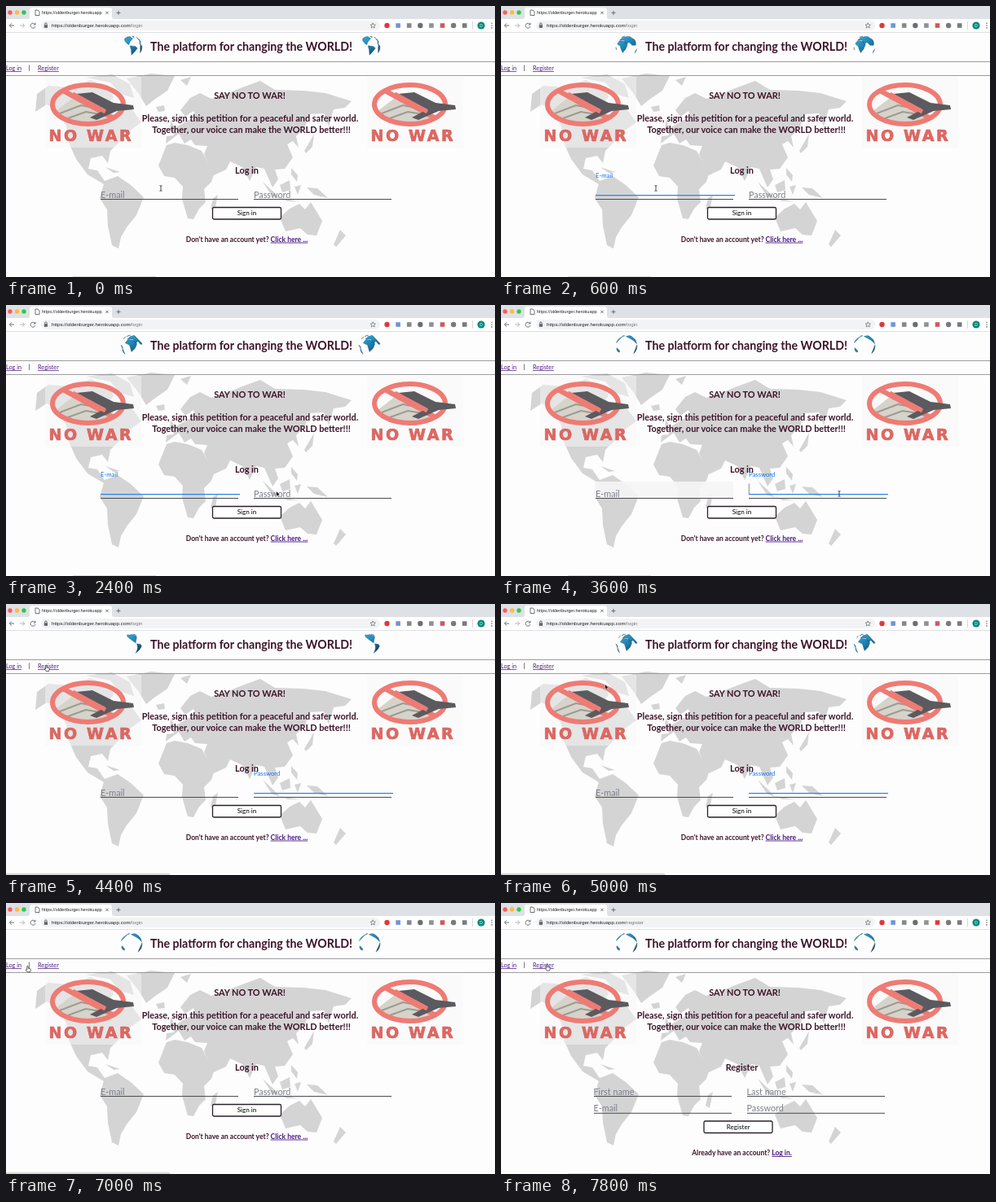
An HTML page for the animation above (8000 ms loop, 600 px wide and 333 px high).

```html
<!DOCTYPE html>
<html lang="en">
<head>
<meta charset="utf-8">
<title>Petition login</title>
<style>
html, body { margin: 0; width: 100%; height: 100%; overflow: hidden; background: #fdfdfd; }
svg { display: block; width: 600px; height: 333px; }
text { font-family: Lato, sans-serif; }
.ui text, .list text { font-family: "Liberation Sans", Arial, sans-serif; }
.ui text { font-size: 6.25px; fill: #202124; }
.list text { font-size: 6.1px; fill: #222; }
.head { font-weight: 700; fill: #3d1428; text-anchor: middle; font-size: 10.9px; }
.small { font-size: 8.5px; }
.link { fill: #4b1a85; text-decoration: underline; }
.nav { font-size: 7.25px; }
.hint { font-size: 10.8px; fill: #7b7f8a; }
.label { font-size: 7.7px; fill: #0b74f5; }
.rule { stroke: #4c4c50; fill: none; }
.focus { stroke: #2a83f0; stroke-width: 1.4; }
.btn rect { fill: #fff; stroke: #2a2028; stroke-width: 1.3; }
.btn text { font-size: 8.1px; text-anchor: middle; }
.icon { fill: none; stroke: #5f6368; stroke-width: .9; }
.map { fill: #d4d4d4; }
</style>
</head>
<body>
<svg viewBox="0 0 600 333">
  <defs>
    <linearGradient id="shade" gradientUnits="userSpaceOnUse" x1="146" y1="40" x2="162" y2="62">
      <stop offset=".1" stop-color="#2a9fd0"/><stop offset=".55" stop-color="#1a75a3"/><stop offset="1" stop-color="#17303f"/>
    </linearGradient>
    <g id="banner">
      <rect x="48" y="87" width="118" height="87" fill="#f8f8f8" opacity=".5"/>
      <path d="M60 130L82 113 124 119 128 138 98 146 70 141Z" fill="#d6d3ca"/>
      <path d="M66 132L92 122 118 127M76 138L98 130 122 134" stroke="#9b9b94" stroke-width="2" fill="none"/>
      <g fill="none" stroke="#ee7b74" stroke-width="6">
        <ellipse cx="100.5" cy="121" rx="43.5" ry="24"/>
        <path d="M70 104L132 138"/>
      </g>
      <path d="M86 108L106 106 132 119 156 122 157 127 136 129 111 140 103 137 122 127Z" fill="#5b5a5f"/>
      <path d="M82 108L122 130" fill="none" stroke="#ee7b74" stroke-width="5"/>
      <text x="52.5" y="166" style="font:700 19px 'DejaVu Sans',sans-serif;letter-spacing:2.6px" fill="#e5655f" stroke="#c96561" stroke-width=".7">NO WAR</text>
    </g>
    <path id="globe" fill="url(#shade)" stroke="#174a68" stroke-width=".4"/>
  </defs>

  <rect width="600" height="333" fill="#fdfdfd"/>
  <g class="map">
    <path d="M38 108L52 98 78 100 104 91 128 101 132 112 122 124 134 133 140 120 154 126 166 143 152 153 140 166 128 178 125 193 118 184 104 187 101 200 112 202 121 215 128 218 120 219 100 207 86 188 77 168 74 148 62 127 50 121 36 130Z"/>
    <path d="M98 88L130 84 152 96 157 113 140 108 128 94Z"/>
    <path d="M121 215L137 209 153 220 169 235 160 257 148 272 141 284 138 298 130 294 125 270 124 250 115 236Z"/>
    <path d="M148 89L178 83 207 86 198 104 182 115 172 123 163 108Z"/>
    <path d="M197 171L207 168 223 171 240 178 249 194 256 204 252 216 243 225 245 241 237 249 230 262 223 261 216 237 217 222 207 211 194 209 187 196Z"/>
    <path d="M196 169L197 160 206 159 204 152 214 146 224 140 233 137 230 129 220 136 214 128 226 113 238 107 252 114 270 108 290 100 312 92 330 103 365 104 392 107 424 117 416 125 402 127 396 148 390 132 372 133 367 149 356 160 359 174 352 166 345 170 352 186 342 200 330 201 334 213 327 223 317 200 307 198 299 215 290 198 275 191 270 201 255 208 243 182 247 172 232 171 227 164 219 169 212 157Z"/>
    <path d="M336 260L348 249 360 243 367 250 374 241 388 264 381 282 370 281 361 273 343 277Z"/>
    <path d="M315 216L330 230 336 237 326 233ZM336 220L348 214 349 226 339 229ZM354 222L362 220 358 232ZM369 223L382 224 395 236 378 232ZM336 236L360 240 345 240ZM350 199L358 208 357 216 350 207Z"/>
    <path d="M366 178L373 166 378 157 376 173 368 181ZM201 154L202 141 209 152ZM184 124L194 122 195 129 187 130ZM254 236L260 232 256 252 251 249ZM410 275L417 282 405 296 402 293ZM122 198L140 204 132 205ZM214 91L227 87 222 98Z"/>
  </g>
  <use href="#banner"/><use href="#banner" x="395"/>
  <path d="M82 332.5H184" stroke="#ddd"/>

  <g class="ui">
    <path d="M0 0H600V16H0Z" fill="#dee1e6"/>
    <circle cx="5" cy="8" r="2.7" fill="#fc5b57"/><circle cx="13.5" cy="8" r="2.7" fill="#fdbc40"/><circle cx="22" cy="8" r="2.7" fill="#34c84a"/>
    <path d="M26 16Q29 16 29 13V5Q29 2 32 2H127Q130 2 130 5V13Q130 16 133 16H600V32.5H0V16Z" fill="#fff"/>
    <path id="doc" class="icon" d="M36 5H39L41 7V11.5H36Z"/>
    <path id="spin" class="icon" d="M38.5 5.2A3 3 0 0 0 35.5 8.2" style="stroke:#5a78b8"/>
    <text x="44" y="10.3" style="font-size:5.55px">https://oldenburger.herokuapp</text>
    <text x="117" y="10.3" style="font-size:5.5px" fill-opacity=".4">.</text>
    <path class="icon" d="M122.3 6.7L125.7 10.1M125.7 6.7L122.3 10.1M135.5 8.4H140.5M138 5.9V10.9"/>
    <path class="icon" d="M10 24H4.5M7 21.3L4.3 24L7 26.7"/>
    <path class="icon" d="M17 24H22.5M20 21.3L22.7 24L20 26.7" opacity=".5"/>
    <path id="reload" class="icon" d="M35.6 22.5A3 3 0 1 0 36 25M36 20.7V23H33.7"/>
    <path id="stop" class="icon" d="M30.5 21.5L35.5 26.5M35.5 21.5L30.5 26.5"/>
    <rect x="43" y="18" width="416" height="12" rx="6" fill="#f1f3f4"/>
    <path d="M46.8 23.3H51V26.8H46.8Z" fill="#5f6368"/><path class="icon" d="M47.7 23.5V22A1.2 1.2 0 0 1 50.1 22V23.5"/>
    <text x="56" y="26.1">https://oldenburger.herokuapp.com<tspan id="route" fill="#777b80">/login</tspan></text>
    <path class="icon" style="stroke-width:.7" d="M450.2 20.8L451.1 22.9 453.4 23.1 451.7 24.7 452.2 26.9 450.2 25.7 448.2 26.9 448.7 24.7 447 23.1 449.3 22.9Z"/>
    <g id="tools"></g>
    <path d="M572.5 19V29" stroke="#d5d7da"/>
    <circle cx="583" cy="24" r="4.6" fill="#00897b"/><text x="583" y="25.8" text-anchor="middle" style="font-size:5px;fill:#fff">D</text>
    <path d="M596 21.2V21.3M596 24V24.1M596 26.8V26.9" stroke="#5f6368" stroke-width="1.5" stroke-linecap="round"/>
    <path d="M0 32.5H600" stroke="#d8dadd" stroke-width=".8"/>
  </g>

  <use href="#globe"/><use href="#globe" x="292"/>
  <text class="head" x="301" y="54.5" style="font-size:14.2px">The platform for changing the WORLD!</text>
  <path d="M0 68.5H600M0 85.5H600" stroke="#929296" stroke-width=".9"/>
  <text class="nav link" x="0" y="79.3">Log in</text>
  <text class="nav" x="27.5" y="79">|</text>
  <text class="nav link" x="39" y="79.3">Register</text>
  <text class="head" x="299" y="114">SAY NO TO WAR!</text>
  <text class="head" x="299.5" y="142">Please, sign this petition for a peaceful and safer world.</text>
  <text class="head" x="301" y="156.2">Together, our voice can make the WORLD better!!!</text>

  <g id="login">
    <text class="head" x="295.5" y="206">Log in</text>
    <rect id="fade" x="115" y="217" width="170" height="20" fill="#f5f5f5" opacity=".9"/>
    <path class="rule" d="M116 237.5H285M304 237.5H473"/>
    <text id="mailHint" class="hint" x="116" y="235.6">E-mail</text>
    <text id="passHint" class="hint" x="304" y="235.6">Password</text>
    <g id="mailFocus"><text class="label" x="116" y="211">E-mail</text><path class="focus" d="M116 232.6H287"/></g>
    <g id="passFocus"><text class="label" x="304" y="211">Password</text><path class="focus" d="M304 232.6H475"/></g>
    <path id="caret" d="M304.3 219.5V232" stroke="#555" stroke-width=".7"/>
    <g class="btn"><rect x="253.5" y="247.5" width="84" height="14.5" rx="1.8"/><text x="295.5" y="257.3">Sign in</text></g>
    <text class="head small" x="295.5" y="289.6">Don't have an account yet? <tspan class="link">Click here ...</tspan></text>
  </g>

  <g id="register">
    <text class="head" x="295.5" y="206">Register</text>
    <path class="rule" d="M114 237.5H283M302 237.5H471M114 258.3H283M302 258.3H471"/>
    <text class="hint" x="113.5" y="235.6">First name</text><text class="hint" x="301.5" y="235.6">Last name</text>
    <text class="hint" x="113.5" y="256.4">E-mail</text><text class="hint" x="301.5" y="256.4">Password</text>
    <g class="btn"><rect x="249" y="268" width="84" height="14.5" rx="1.8"/><text x="291.2" y="277.6">Register</text></g>
    <text class="head small" x="295.5" y="310">Already have an account? <tspan class="link">Log in.</tspan></text>
  </g>

  <g id="list" class="list"><path d="M115.5 238.5H285.5V340H115.5Z" fill="#fff" stroke="#c9c9c9" stroke-width=".7"/></g>
  <path id="status" d="M0 331.3H199Q201 331.3 201 333H0Z" fill="#e4e4e4" stroke="#c4c4c4" stroke-width=".6"/>

  <g id="cursor">
    <path id="arrow" d="M0 0V6.5L1.5 5.2 2.6 7.6 3.7 7.1 2.6 4.8H4.7Z" fill="#111" stroke="#fff" stroke-width=".5"/>
    <path id="beam" d="M-1.5 -3.4Q0 -3.4 0 -2.4Q0 -3.4 1.5 -3.4M0 -2.6V2.6M-1.5 3.4Q0 3.4 0 2.4Q0 3.4 1.5 3.4" fill="none" stroke="#222" stroke-width=".8"/>
    <path id="hand" d="M-1.2 -3.6Q-.5 -4.3 .1 -3.5V-1L2.9 -.3Q3.5 0 3.2 1.2L2.5 3.6H-.8L-2.8 .9Q-2.5 0 -1.2 .7Z" fill="#fff" stroke="#222" stroke-width=".7"/>
  </g>
</svg>
<script>
const LOOP = 8000, STEP = 200;
const $ = id => document.getElementById(id);
const show = (id, on) => { $(id).style.display = on ? "" : "none"; };
const add = (parent, tag, attrs, text = "") => {
  const el = document.createElementNS("http://www.w3.org/2000/svg", tag);
  for (const k in attrs) el.setAttribute(k, attrs[k]);
  el.textContent = text;
  return $(parent).appendChild(el);
};

["kelborantimesh@posta.test", "pilot-ok@box.test", "oleg@qx", "a@", "mk@box", "qux@qux"]
  .forEach((s, i) => add("list", "text", { x: 120.5, y: 252 + i * 15.2 }, s));

const tools = ["#e0393e", "#6d95d8", "#85888c", "#6b6e72", "#8b9298", "#d0585c", "#777b80", "#777b80"]
  .map((fill, i) => i % 3 === 0
    ? add("tools", "circle", { cx: 467.5 + i * 13.6, cy: 24, r: 3.2, fill })
    : add("tools", "rect", { x: 464.7 + i * 13.6, y: 21.2, width: 5.6, height: 5.6, fill }));

// Rows of time and value(s); numbers between rows are interpolated.
const pointer = [
  [0, 190, 224, "beam"], [800, 190, 224, "arrow"], [1400, 306, 234.5, "arrow"],
  [2400, 331.5, 228.5, "arrow"], [2600, 340, 230, "beam"], [3200, 415, 232, "beam"],
  [3800, 415, 232, "arrow"], [4400, 50, 79, "hand"], [4600, 70, 84, "arrow"],
  [5000, 127.5, 98.5, "arrow"], [5600, 12, 82, "hand"], [6800, 12, 82, "hand"],
  [7400, 57, 79.5, "hand"], [8000, 57, 79.5, "hand"]
];
const spin = [[0, -70], [1400, -640], [2400, -1060], [3600, -1600], [5000, -2140], [6200, -2680], [7800, -3400], [8000, -3485]];
function at(rows, t) {
  const i = Math.max(1, rows.findIndex(r => r[0] > t));
  const a = rows[i - 1], b = rows[i], k = (t - a[0]) / (b[0] - a[0]);
  return a.map((v, j) => typeof v === "number" ? v + (b[j] - v) * k : v);
}

const rad = Math.PI / 180;
// Continents as [longitude, latitude] corners; the globe's oceans are clear.
const lands = [
  [[-17, 15], [-5, 35], [32, 31], [51, 11], [40, -15], [20, -35], [9, 4]],
  [[-9, 38], [5, 60], [60, 75], [170, 70], [140, 50], [120, 28], [105, 8], [78, 8], [60, 25], [45, 13], [30, 38]],
  [[-165, 62], [-100, 75], [-60, 52], [-80, 27], [-85, 10], [-97, 18], [-120, 35]],
  [[-78, 5], [-50, 2], [-36, -8], [-55, -35], [-70, -52], [-72, -18]],
  [[114, -22], [135, -12], [153, -27], [145, -38], [118, -34]],
  [[-55, 80], [-20, 80], [-22, 70], [-45, 60]]
];

// Orthographic outline of the part that faces the viewer.
function outline(shape, lon) {
  const points = [], cuts = 8;
  shape.forEach(([l0, p0], i) => {
    const [l1, p1] = shape[(i + 1) % shape.length];
    for (let c = 0; c < cuts; c++) {
      const l = (l0 + (l1 - l0) * c / cuts - lon) * rad, p = (p0 + (p1 - p0) * c / cuts) * rad;
      if (Math.cos(l) < 0) continue;
      const x = 154 + 13 * Math.cos(p) * Math.sin(l), y = 50 - 13 * Math.sin(p);
      points.push(`${x.toFixed(2)} ${y.toFixed(2)}`);
    }
  });
  return points.length > 2 ? `M${points.join("L")}Z` : "";
}

function draw(t) {
  const [, lon] = at(spin, t);
  $("globe").setAttribute("d", lands.map(s => outline(s, lon)).join(""));

  const mail = t >= 400 && t < 3200, pass = t >= 3200 && t < 5800;
  const joined = t >= 7600, loading = t >= 5800 && t < 6600;
  show("mailFocus", mail); show("mailHint", !mail);
  show("passFocus", pass); show("passHint", !pass);
  show("caret", t >= 3200 && t < 4000);
  show("fade", t >= 3200 && t < 4000);
  show("list", t >= 800 && t < 1800);
  show("status", t >= 4400 && t < 7400);
  show("login", !joined); show("register", joined);
  show("doc", !loading); show("reload", !loading);
  show("spin", loading); show("stop", loading);
  $("spin").setAttribute("transform", `rotate(${(t - 6200) * .45} 38.5 8.2)`);
  $("route").textContent = joined ? "/register" : "/login";
  tools[5].setAttribute("fill", joined ? "#e0393e" : "#d0585c");

  const [, x, y, kind] = at(pointer, t);
  $("cursor").setAttribute("transform", `translate(${x} ${y})`);
  for (const k of ["arrow", "beam", "hand"]) show(k, k === kind);
}

const start = performance.now();
function tick() {
  const t = (performance.now() - start) % LOOP;
  draw(Math.floor(t / STEP) * STEP);
  requestAnimationFrame(tick);
}
tick();
</script>
</body>
</html>
```
